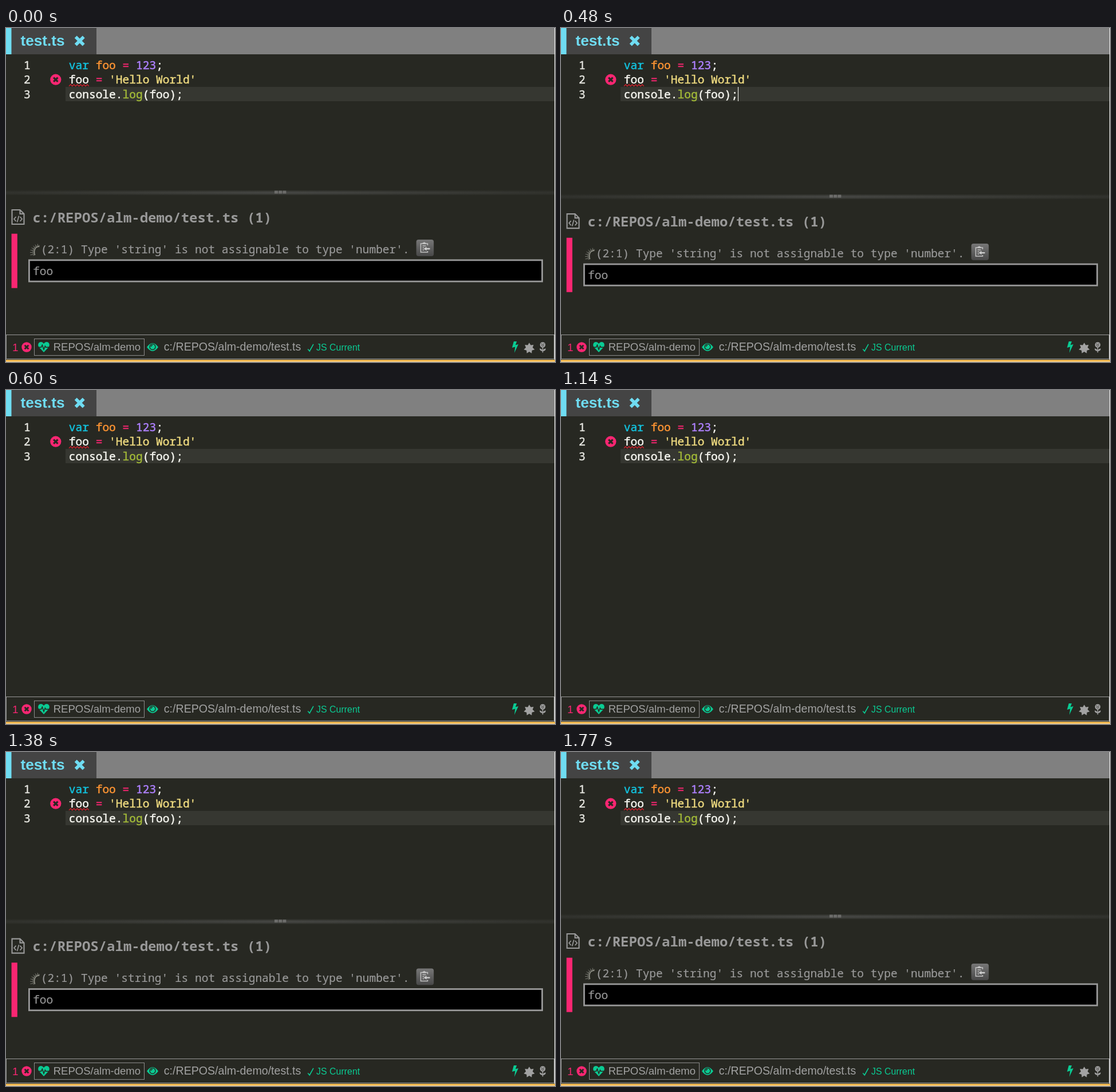
Write an HTML page with a canvas that moves like this. It is 959 by 584 pixels and loops after 2010 ms.

```html
<!DOCTYPE html>
<html lang="en">
<head>
<meta charset="utf-8">
<title>Editor error panel</title>
<style>
  html, body { margin: 0; width: 100%; height: 100%; overflow: hidden; background: #272822; }
  canvas { display: block; width: 959px; height: 584px; }
</style>
</head>
<body>
<canvas id="stage"></canvas>
<script>
const W = 959, H = 584, LOOP = 2010, TICK = 30;
const BG = '#272822', PINK = '#f92672', GREY = '#999', GREEN = '#0acb93', CYAN = '#6fdcf2', WHITE = '#f8f8f2';
const PALE = '#a2a2a2';
const MONO = '"Noto Sans Mono", monospace', SANS = '"Liberation Sans", Arial, sans-serif';
const CODE_SIZE = 19.53, CHAR = CODE_SIZE * 0.6;
const PANEL_TRAVEL = 251, MOVE = 135, CLOSE_AT = 465.5, OPEN_AT = 1261;
const CURSOR_ON = [[210, 540], [840, 1140], [1440, 1770]];

const LINES = [
  [['var ', '#12c4e0'], ['foo ', '#fd9433'], ['= ', PINK], ['123', '#ae81ff'], [';', WHITE]],
  [['foo ', WHITE], ['= ', PINK], ["'Hello World'", '#f0dc80']],
  [['console.', WHITE], ['log', '#a3bb38'], ['(foo);', WHITE]]
];

const canvas = document.getElementById('stage');
const ctx = canvas.getContext('2d');
const dpr = window.devicePixelRatio || 1;
canvas.width = W * dpr;
canvas.height = H * dpr;

function rect(x, y, w, h, color) {
  ctx.fillStyle = color;
  ctx.fillRect(x, y, w, h);
}

function frame(x, y, w, h, color, line) {
  ctx.strokeStyle = color;
  ctx.lineWidth = line;
  ctx.strokeRect(x + line / 2, y + line / 2, w - line, h - line);
}

// "bolder" thickens the strokes by that many pixels.
function text(str, x, y, color, font, bolder = 0) {
  ctx.font = font;
  ctx.fillStyle = color;
  ctx.fillText(str, x, y);
  if (bolder) {
    ctx.strokeStyle = color;
    ctx.lineWidth = bolder;
    ctx.strokeText(str, x, y);
  }
}

function disc(x, y, r, color) {
  ctx.fillStyle = color;
  ctx.beginPath();
  ctx.arc(x, y, r, 0, Math.PI * 2);
  ctx.fill();
}

function fillPath(d, x, y, color) {
  ctx.save();
  ctx.translate(x, y);
  ctx.fillStyle = color;
  ctx.fill(new Path2D(d));
  ctx.restore();
}

function strokePath(d, x, y, color, line) {
  ctx.save();
  ctx.translate(x, y);
  ctx.strokeStyle = color;
  ctx.lineWidth = line;
  ctx.stroke(new Path2D(d));
  ctx.restore();
}

function cross(x, y, r, color, line) {
  strokePath(`M${-r} ${-r}L${r} ${r}M${r} ${-r}L${-r} ${r}`, x, y, color, line);
}

function errorBadge(x, y, r) {
  disc(x, y, r, PINK);
  cross(x, y, r * 0.38, BG, r * 0.34);
}

function drawTab() {
  rect(0, 0, 958, 46, '#808080');
  rect(0, 0, 158, 46, '#444');
  rect(0, 0, 9.5, 46, CYAN);
  text('test.ts', 25.5, 31, CYAN, `bold 26.2px ${SANS}`);
  cross(128.7, 22.5, 7, CYAN, 5.6);
}

function drawCode() {
  rect(104, 103, 854, 25, '#363731');
  const font = `${CODE_SIZE}px ${MONO}`;
  LINES.forEach((parts, row) => {
    const y = 72.2 + row * 25.2;
    text(String(row + 1), 31, y, '#e6e6e0', font, 0.45);
    let x = 109.8;
    for (const [str, color] of parts) {
      text(str, x, y, color, font, 0.45);
      x += str.length * CHAR;
    }
  });
  errorBadge(86.8, 90.2, 9.6);

  ctx.beginPath();
  for (let i = 0; i <= 12; i++) ctx.lineTo(110 + i * 2.9, i % 2 ? 98.8 : 101.8);
  ctx.strokeStyle = '#d0202c';
  ctx.lineWidth = 1.3;
  ctx.stroke();
}

function drawSplitter() {
  const glow = ctx.createLinearGradient(0, 0, W, 0);
  glow.addColorStop(0, '#30312c');
  glow.addColorStop(0.5, '#444542');
  glow.addColorStop(1, '#30312c');
  ctx.globalAlpha = 0.5;
  rect(0, 284, 958, 8, glow);
  ctx.globalAlpha = 1;
  rect(0, 286, 958, 4, glow);
  for (let i = 0; i < 3; i++) rect(469 + i * 7.2, 284.5, 6, 5, '#6c6c6a');
}

function drawFileIcon() {
  strokePath('M1 1H15L22 8V26H1ZM15 1V8H22', 9.5, 317, GREY, 2.1);
  strokePath('M8 13L4.5 17L8 21M15 13L18.5 17L15 21M13 11.5L10 22.5', 9.5, 317, GREY, 1.7);
}

function drawBug() {
  strokePath('M9 21C6.5 13 7.5 5 19 4', 40, 377, '#55564f', 3.2);
  strokePath('M10.5 20C8.5 13 10 6 18 5', 40, 377, '#c4c4b8', 1);
  for (let i = 0; i < 7; i++) {
    const a = Math.PI * (0.92 + i * 0.09);
    const c = Math.cos(a), s = Math.sin(a);
    strokePath(`M${c * 10.5} ${s * 12}L${c * 15} ${s * 15.5}`, 57, 393, '#8e8e86', 0.8);
  }
}

function drawCopyButton() {
  const shade = ctx.createLinearGradient(0, 370, 0, 399);
  shade.addColorStop(0, '#777');
  shade.addColorStop(1, '#484848');
  ctx.fillStyle = shade;
  ctx.beginPath();
  ctx.roundRect(716.7, 370, 30.5, 29, 4);
  ctx.fill();
  strokePath('M13 6V3H1V18H13V16M4 7H10M4 10.5H7M4 14H7', 723.5, 374, '#c4c4c4', 1.5);
  fillPath('M4 4V1.5H5.5Q7 -1 8.5 1.5H10V4Z', 723.5, 374, '#c4c4c4');
  fillPath('M6.5 12L11 8.5V10.8H17V13.2H11V15.5Z', 723.5, 374, '#d0d0d0');
}

function drawPanel(offset) {
  ctx.save();
  ctx.beginPath();
  ctx.rect(0, 128, W, 408);
  ctx.clip();
  ctx.translate(0, offset);
  rect(0, 292, W, 250, BG);
  drawSplitter();
  drawFileIcon();
  text('c:/REPOS/alm-demo/test.ts (1)', 46.5, 339.7, GREY, `bold 24px ${MONO}`);
  rect(9.6, 359.7, 10.2, 95, PINK);
  drawBug();
  text("(2:1) Type 'string' is not assignable to type 'number'.", 60.7, 393.8, GREY, `${CODE_SIZE}px ${MONO}`, 0.2);
  drawCopyButton();
  rect(39, 405, 899, 39, '#000');
  frame(39, 404.5, 899, 40, GREY, 2.8);
  text('foo', 47, 431.5, GREY, `${CODE_SIZE}px ${MONO}`, 0.2);
  ctx.restore();
}

function drawHeart(x, y) {
  fillPath('M10 18L1.5 9C-1 6 0 0 5 0C7.5 0 9 1.5 10 3C11 1.5 12.5 0 15 0C20 0 21 6 18.5 9Z', x, y, GREEN);
  strokePath('M0 9.2H5.5L7.3 5.2L10 13L12.3 7.2L13.5 9.2H20', x, y, BG, 1.5);
}

function drawEye(x, y) {
  fillPath('M0 7Q10 -7 20 7Q10 21 0 7Z', x, y, GREEN);
  ctx.strokeStyle = BG;
  ctx.lineWidth = 1.4;
  ctx.beginPath();
  ctx.arc(x + 10, y + 6.5, 5, 0, Math.PI * 2);
  ctx.stroke();
  strokePath('M7.2 6.5Q7.4 3.8 10 3.6', x, y, BG, 1.2);
}

function drawStar(x, y) {
  ctx.beginPath();
  for (let i = 0; i < 14; i++) {
    const a = i * Math.PI / 7 - Math.PI / 2, r = i % 2 ? 6 : 9.8;
    ctx.lineTo(x + Math.cos(a) * r, y + Math.sin(a) * r);
  }
  ctx.fillStyle = PALE;
  ctx.fill();
}

function drawRose(x, y) {
  disc(x, y + 5, 4.8, PALE);
  strokePath('M-3 3Q0 6 3 3M-2.5 6Q0 8.5 2.5 6', x, y, BG, 0.9);
  strokePath('M0 9V18.5', x, y, PALE, 1.6);
  fillPath('M0 16Q-5 16 -5.5 11.5Q-1 11.5 0 16Q1 11.5 5.5 11.5Q5 16 0 16Z', x, y, PALE);
}

function drawStatus() {
  rect(0, 536, W, 48, BG);
  frame(0, 536, 958, 43, GREY, 1);
  text('1', 11, 565, PINK, `19px ${SANS}`);
  errorBadge(36, 558, 8.7);
  frame(49, 543, 193, 30, '#8c8c8c', 1);
  drawHeart(56, 549);
  text('REPOS/alm-demo', 82.7, 564.3, PALE, `18.55px ${SANS}`);
  drawEye(246, 551);
  text('c:/REPOS/alm-demo/test.ts', 275.8, 564.3, PALE, `19.6px ${SANS}`);
  strokePath('M.8 9.5L3.8 13L10.5 .8', 526.5, 552, GREEN, 1.6);
  text('JS Current', 542, 564.3, GREEN, `15.95px ${SANS}`);
  fillPath('M3 0H8.2L6 6.2L11 5L4 20L5.4 9.5L0 11Z', 884, 548, GREEN);
  drawStar(914, 560);
  drawRose(937.5, 549);
}

function drawWindowEdge() {
  rect(958, 0, 1, H, '#f0f0f0');
  rect(0, 580, W, 1, '#f7c766');
  rect(0, 581, W, 2, '#eeb147');
  rect(0, 583, W, 1, '#fbe3b4');
}

function ease(t, start) {
  const p = Math.min(1, Math.max(0, (t - start) / MOVE));
  return 0.5 - 0.5 * Math.cos(Math.PI * p);
}

function draw(now) {
  const t = Math.floor((now % LOOP) / TICK) * TICK;
  const hidden = ease(t, CLOSE_AT) - ease(t, OPEN_AT);

  ctx.setTransform(dpr, 0, 0, dpr, 0, 0);
  rect(0, 0, W, H, BG);
  drawTab();
  drawCode();
  if (CURSOR_ON.some(([on, off]) => t >= on && t < off)) rect(309, 103, 1, 25, WHITE);
  if (hidden < 0.999) drawPanel(hidden * PANEL_TRAVEL);
  drawStatus();
  drawWindowEdge();
}

const begin = performance.now();
function loop() {
  draw(performance.now() - begin);
  requestAnimationFrame(loop);
}
loop();
</script>
</body>
</html>
```
